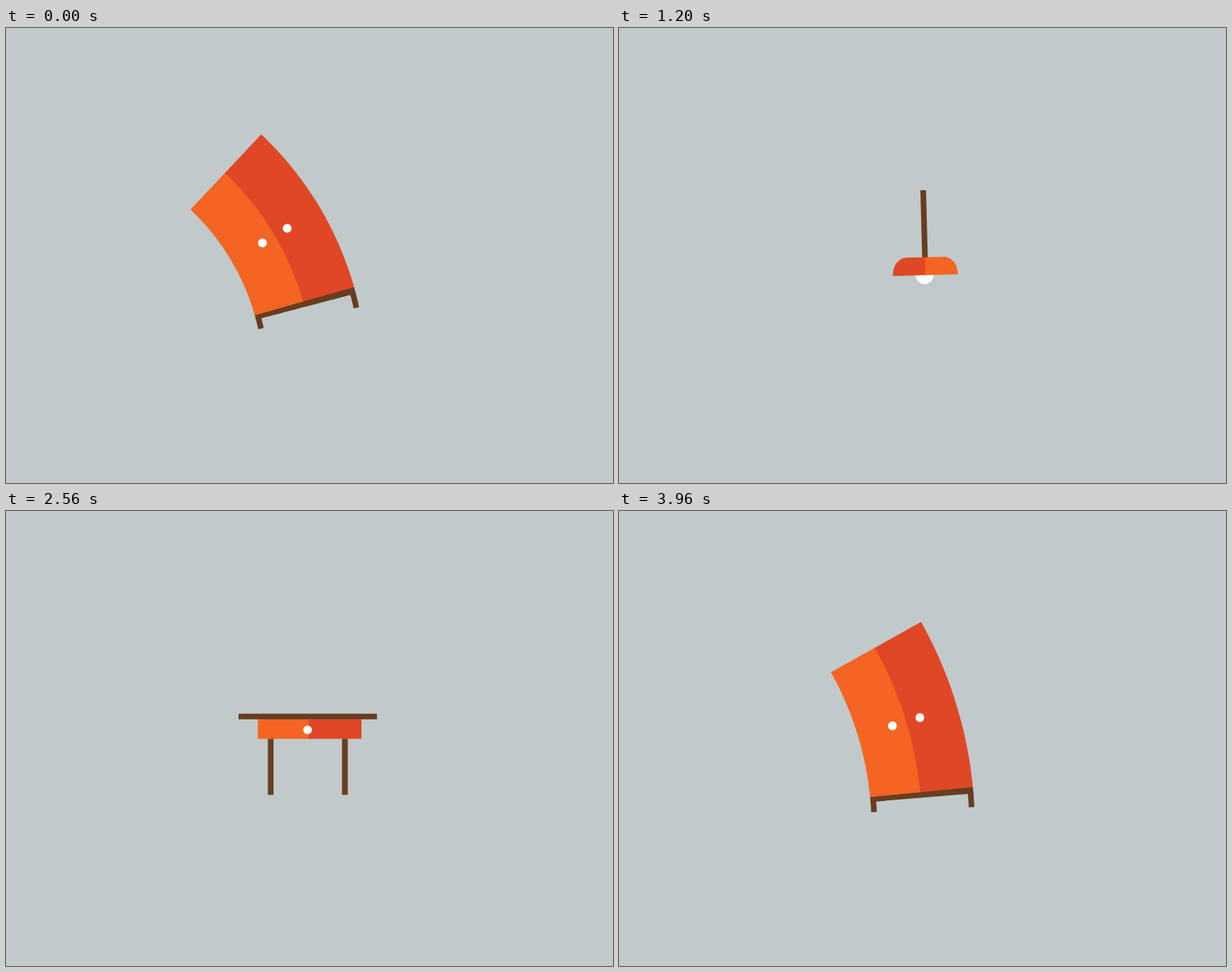
Recreate the animation shown at these times as an HTML page with a canvas. Size 864 by 648 pixels, loop 4000 ms.

```html
<!DOCTYPE html>
<html lang="en">
<head>
<meta charset="utf-8">
<title>Furniture loop</title>
<style>
  html, body { margin: 0; width: 100%; height: 100%; overflow: hidden; background: #c1c9ca; }
  canvas { display: block; }
</style>
</head>
<body>
<canvas id="stage" width="864" height="648"></canvas>
<script>
const ctx = document.getElementById('stage').getContext('2d');
const LOOP = 4000, STEPS = 120;
const ORANGE = '#f46523', RED = '#e04727', BROWN = '#673e22',
      CREAM = '#f1edc8', WHITE = '#fff', BACK = '#c1c9ca';
const rad = degrees => degrees * Math.PI / 180;

// Monotone cubic curve through [step, value] keys.
function curve(...keys) {
  const slope = i => (keys[i + 1][1] - keys[i][1]) / (keys[i + 1][0] - keys[i][0]);
  const tangents = keys.map((_, i) => {
    if (i === 0 || i === keys.length - 1) return 0;
    const a = slope(i - 1), b = slope(i);
    return a * b <= 0 ? 0 : 2 * a * b / (a + b);
  });
  const last = keys.length - 1;
  return k => {
    if (k <= keys[0][0]) return keys[0][1];
    if (k >= keys[last][0]) return keys[last][1];
    const i = keys.findIndex(key => key[0] > k) - 1;
    const [x0, y0] = keys[i], [x1, y1] = keys[i + 1];
    const w = x1 - x0, u = (k - x0) / w, v = 1 - u;
    return v * v * (1 + 2 * u) * y0 + u * u * (3 - 2 * u) * y1
      + w * u * v * (v * tangents[i] - u * tangents[i + 1]);
  };
}

const swing = {
  angle: curve([2, -58], [3, -48], [5, -18], [7, 8], [10, 28], [13, 24.5], [16, 17.5],
               [21, 9.4], [26, -6.3], [32, 3.2], [36, 1.5], [40, -0.3], [45, 0]),
  stretch: curve([2, 1.2], [5, 1.72], [7, 1.78], [10, 1.65], [16, 1.34], [20, 1])
};
const flip = {
  angle: curve([49, 0], [53, -8], [58, 55.4], [65, 180]),
  y: curve([49, 324], [53, 331], [58, 292.8], [65, 207])
};
const table = {
  lift: curve([65, 150], [66, 138], [70, 0], [93, 0], [94, 2], [95, 12], [96, 30]),
  stretch: curve([66, 1.1], [70, 1.04], [71, 0.8], [73, 1.08], [75, 0.97], [77, 1],
                 [86, 1], [90, 0.85], [94, 1.085], [96, 1.16])
};
const cabinet = {
  lift: curve([97, 60], [98, 66], [101, 0]),
  wide: curve([97, 0.8], [100, 0.92], [102, 1.62], [103, 1.5], [106, 0.9], [109, 1.04], [112, 1]),
  tall: curve([97, 0.85], [98, 0.88], [101, 1], [102, 0.6], [103, 0.66], [106, 1.13], [109, 0.96], [112, 1]),
  bend: curve([110, 0], [114, -5], [116, 3], [118, 17], [119, 26.3], [120, 34.4], [121, 42]),
  lean: curve([117, 0], [118, 0.3], [119, 2.9], [120, 12.3], [121, 21])
};

function box(color, x0, y0, x1, y1) {
  ctx.fillStyle = color;
  ctx.fillRect(x0, y0, x1 - x0, y1 - y0);
}
function dot(x, y, r) {
  ctx.fillStyle = WHITE;
  ctx.beginPath();
  ctx.arc(x, y, r, 0, 2 * Math.PI);
  ctx.fill();
}
function polygon(color, points) {
  ctx.fillStyle = color;
  ctx.beginPath();
  points.forEach(p => ctx.lineTo(...p));
  ctx.fill();
}

function halfShade(color, side) {
  ctx.fillStyle = color;
  ctx.beginPath();
  ctx.moveTo(0, 95.5);
  ctx.lineTo(25 * side, 95.5);
  ctx.bezierCurveTo(38 * side, 95.5, 46 * side, 106, 46.5 * side, 121);
  ctx.lineTo(0, 121);
  ctx.fill();
}

// Origin is the free end of the rod.
function drawLamp(lit) {
  if (lit) polygon(CREAM, [[-17, 120], [12.5, 120], [38.7, 166.5], [-45, 166.5]]);
  dot(-1.2, 121, 12.7);
  box(BROWN, -4, 0, 4, 97);
  box(RED, -1, 95.5, 0.5, 121);
  halfShade(RED, -1);
  halfShade(ORANGE, 1);
}

function drawSwing(k) {
  ctx.translate(433, 231);
  ctx.rotate(-rad(swing.angle(k)));
  ctx.scale(1, swing.stretch(k));
  drawLamp(k >= 47);
}

function drawFlip(k) {
  ctx.translate(433, flip.y(k));
  ctx.rotate(rad(flip.angle(k)));
  ctx.translate(0, -93);
  drawLamp(true);
}

// Origin is on the floor; heights are negative.
function drawTable(k) {
  ctx.translate(0, 404.3 - table.lift(k));
  ctx.scale(1, table.stretch(k));
  box(BROWN, 372.7, -80, 380.8, 0);
  box(BROWN, 478.3, -80, 486.5, 0);
  box(ORANGE, 358.5, -108, 431, -79.8);
  box(RED, 430.5, -108, 506, -79.8);
  box(BROWN, 331, -115.6, 528, -107.6);
  dot(429.3, -92.5, 6.2);
}

function drawCabinet(k) {
  const height = 243, half = 73.5;
  const bend = rad(cabinet.bend(k)) || 1e-5;
  const radius = height / bend;
  const warp = (u, v) => {
    const a = bend * v / height;
    return [(radius + u) * Math.cos(a) - radius, -(radius + u) * Math.sin(a)];
  };
  const panel = (color, u0, v0, u1, v1) => {
    const n = 24, points = [];
    const edge = (ua, va, ub, vb) => {
      for (let i = 0; i < n; i++) {
        points.push(warp(ua + (ub - ua) * i / n, va + (vb - va) * i / n));
      }
    };
    edge(u0, v0, u0, v1);
    edge(u0, v1, u1, v1);
    edge(u1, v1, u1, v0);
    edge(u1, v0, u0, v0);
    polygon(color, points);
  };

  ctx.translate(432.5, 429 - cabinet.lift(k));
  ctx.scale(cabinet.wide(k), cabinet.tall(k));
  ctx.translate(-half, 0);
  ctx.rotate(-rad(cabinet.lean(k)));
  ctx.translate(half, 0);

  panel(ORANGE, -half, 24, -1, height);
  panel(RED, -2, 24, half, height);
  panel(BROWN, -half, 17, half, 25);
  panel(BROWN, -half, 0, 8 - half, 18);
  panel(BROWN, half - 8, 0, half, 18);
  dot(...warp(-22.4, 128), 6.3);
  dot(...warp(18.4, 128), 6.3);
}

function draw(ms) {
  const k = Math.floor((ms % LOOP + 8) * STEPS / LOOP) % STEPS;
  ctx.setTransform(1, 0, 0, 1, 0, 0);
  box(BACK, 0, 0, 864, 648);
  if (k < 2) drawCabinet(k + STEPS);
  else if (k < 50) drawSwing(k);
  else if (k < 66) drawFlip(k);
  else if (k < 97) drawTable(k);
  else drawCabinet(k);
}

const start = performance.now();
function tick() {
  draw(performance.now() - start);
  requestAnimationFrame(tick);
}
tick();
</script>
</body>
</html>
```
